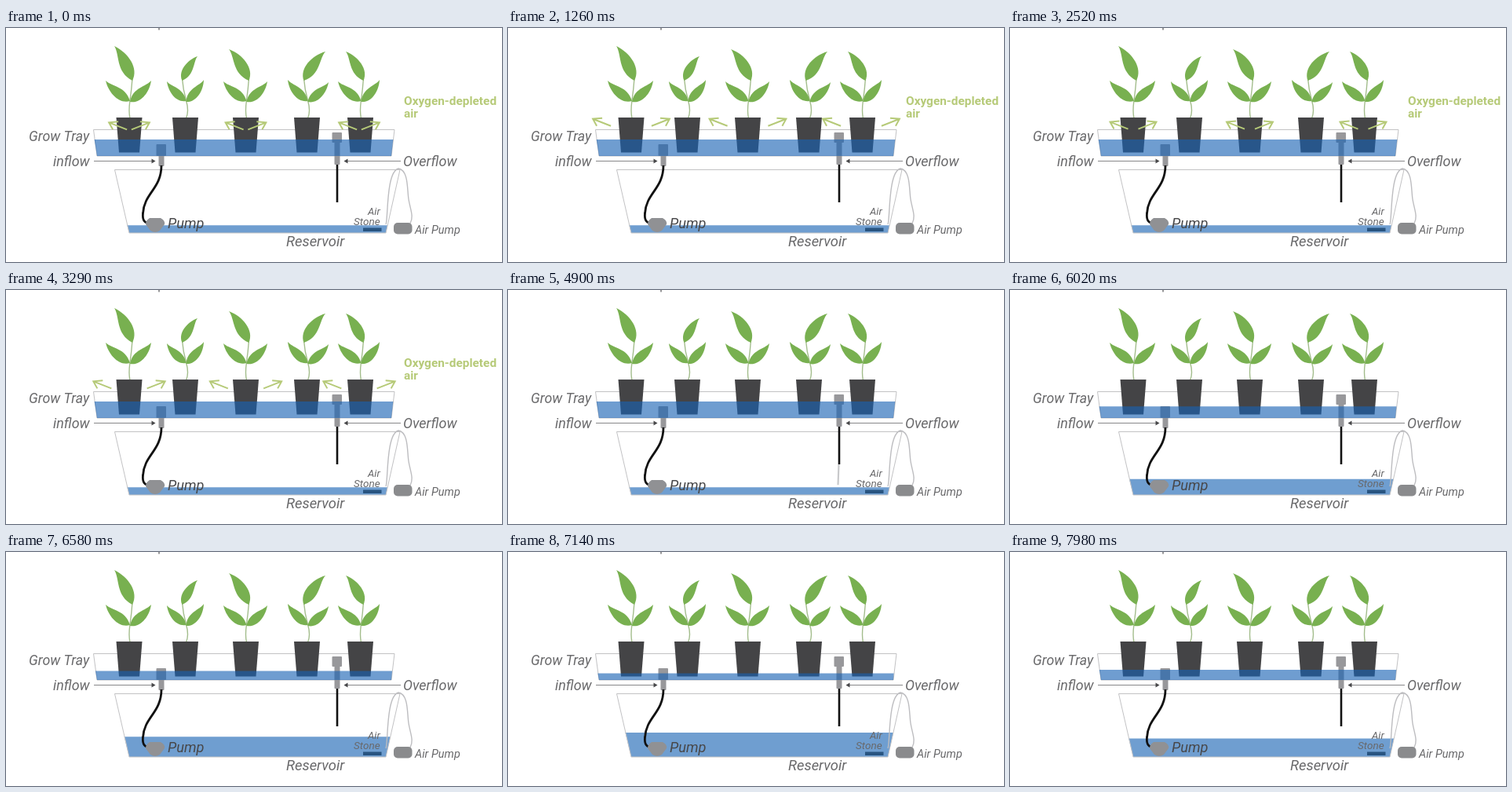
An HTML page with a canvas for the animation above (8000 ms loop, 632 px wide and 298 px high).

```html
<!DOCTYPE html>
<html lang="en">
<head>
<meta charset="utf-8">
<title>Ebb and flow system</title>
<style>
html, body { margin: 0; width: 100%; height: 100%; overflow: hidden; background: #fff; }
canvas { display: block; }
</style>
</head>
<body>
<canvas id="stage" width="632" height="298"></canvas>
<script>
const ctx = document.getElementById('stage').getContext('2d');
const LOOP = 8000;
const INK = '#69696b', GREY = '#98989b', PALE = '#c2c2c4', BLACK = '#111';
const LEAF = '#78b050', LIME = '#b6ca78', WATER = 'rgba(23,98,179,.62)';

// centre x, then the tips of the top, left and right leaves
const plants = [
  [157, 138, 23, 127, 67, 185, 67],
  [228.5, 244, 36, 205, 68, 252, 66],
  [305.5, 284, 27, 277, 68, 333, 68],
  [383.5, 407, 30, 359, 66, 411, 69],
  [451.5, 433, 30, 423, 68, 476, 66]
];

const clamp = v => Math.max(0, Math.min(1, v));
const span = (t, from, to) => clamp((t - from) / (to - from));
const ease = p => (1 - Math.cos(Math.PI * p)) / 2;

function stroke(path, color, width) {
  ctx.strokeStyle = color;
  ctx.lineWidth = width;
  ctx.stroke(new Path2D(path));
}

function fill(path, color) {
  ctx.fillStyle = color;
  ctx.fill(new Path2D(path));
}

function box(x, y, w, h, color, radius = 1) {
  ctx.fillStyle = color;
  ctx.beginPath();
  ctx.roundRect(x, y, w, h, radius);
  ctx.fill();
}

function label(text, x, y, size, color = INK, style = 'italic') {
  ctx.font = `${style} ${size}px Roboto, sans-serif`;
  ctx.fillStyle = color;
  ctx.fillText(text, x, y);
}

// Leaf with one full edge (on the given side) and one that hollows near the tip.
function leaf(bx, by, tx, ty, side) {
  const dx = tx - bx, dy = ty - by;
  const at = (k, w) => `${bx + dx * k - dy * w * side} ${by + dy * k + dx * w * side}`;
  fill(`M${bx} ${by}C${at(.2, .3)} ${at(.68, .24)} ${tx} ${ty}` +
       `C${at(.75, .03)} ${at(.4, -.28)} ${bx} ${by}`, LEAF);
}

function plant([x, topX, topY, leftX, leftY, rightX, rightY]) {
  const side = Math.sign(x - topX), baseX = x + side * 4;
  stroke(`M${baseX} 64Q${baseX - side} 78 ${x + 1} 92T${x + 1} 115`, '#a3bd8c', 1.4);
  leaf(baseX, 67, topX, topY, side);
  leaf(x + 1, 93, leftX, leftY, -1);
  leaf(x + 1, 94, rightX, rightY, 1);
  fill(`M${x - 16.5} 114h33l-3.5 44.5h-26z`, '#444446');
}

function airArrow(x, dir, reach) {
  const tip = x + dir * reach, y = 125.5 - reach * .2;
  stroke(`M${tip - dir * 23} ${y + 9}L${tip} ${y}` +
         `M${tip - dir * 12} ${y - 1}L${tip} ${y}l${-dir * 5} 9`, LIME, 2);
}

function trayWater(level) {
  const inset = (level - 130) * .14;
  fill(`M${111 + inset} ${level}H${495 - inset}L491 163H116z`, WATER);
}

function reservoir(level) {
  const inset = (level - 180) * .23;
  fill(`M${138 + inset} ${level}H${502.5 - inset}L484 261H157z`, 'rgb(111,158,208)');
  stroke('M138.5 180.5H502L484 261H157z', PALE, 1);
}

function hardware() {
  stroke('M198 175C198 205 176 210 174.5 236C173.5 245 177 249 184 249', BLACK, 2.8);
  fill('M183 242H197Q203 245 202 250L196 258Q190 262 184 258L178 250Q178 245 183 242Z', '#909194');
  stroke('M422 174V222', BLACK, 2.6);
  stroke('M484 250C487 245 484 183 500 179C513 181 511 205 513 218S520 240 515 249', '#bdbdc0', 1.4);
  box(494, 248, 23.5, 14.5, '#8a8b8d', 5);
  box(455, 254.5, 23.5, 4.5, '#285480', 0);
}

function labels() {
  label('Grow Tray', 29, 143.5, 17.8);
  label('inflow', 60, 175.5, 17.9);
  label('Overflow', 506, 175.5, 18);
  label('Pump', 206, 255, 18.3, '#48484a');
  label('Reservoir', 357, 277.5, 18.4);
  label('Air Pump', 521, 262, 14.5);
  label('Air', 461, 238, 13.2);
  label('Stone', 443, 250.5, 13.5);
  stroke('M112 169.5H187M435 169.5H503', '#88888a', 1.2);
  fill('M185.5 166.5L190.5 169.5L185.5 172.5zM435.5 166.5L430.5 169.5L435.5 172.5z', '#48484a');
  stroke('M195 2.5V0', INK, 1.4);
}

function draw(t) {
  ctx.fillStyle = '#fff';
  ctx.fillRect(0, 0, 632, 298);

  // The tray drains into the reservoir, then the pump starts to refill it.
  const drained = span(t, 4900, 7140) - (t > 7140 ? (t - 7140) / 2350 : 0);
  reservoir(251.3 - 21.3 * drained);

  stroke('M111.5 129.5H495L491 163H116z', PALE, 1);
  plants.forEach(plant);
  box(191.5, 148, 12.5, 15, GREY);
  box(194.5, 160, 7, 16, GREY);
  box(415.5, 133, 12.5, 13, GREY);
  box(418.5, 144, 7, 30, GREY);
  trayWater(142 + 12.5 * drained);
  hardware();

  if (t > 4480 && t < 5400) {
    const top = 222 + 30 * span(t, 5000, 5400);
    const end = 222 + 30 * span(t, 4480, 4960);
    stroke(`M421.5 ${top}L420.5 ${end}`, '#c8c9cb', 2.2);
  }
  labels();

  // Air leaves the pots twice before the tray drains.
  ctx.globalAlpha = 1 - span(t, 4480, 4620);
  const age = t < 2030 ? t + 210 : t - 2030;
  const reach = 25 + 26 * ease(clamp(age / 1800));
  for (const x of [157, 305.5, 450]) {
    airArrow(x, -1, reach);
    airArrow(x, 1, reach);
  }
  label('Oxygen-depleted', 507, 98, 15.4, LIME, 'bold');
  label('air', 507, 114, 15.4, LIME, 'bold');
  ctx.globalAlpha = 1;
}

function tick() {
  draw(performance.now() % LOOP);
  requestAnimationFrame(tick);
}
tick();
</script>
</body>
</html>
```
